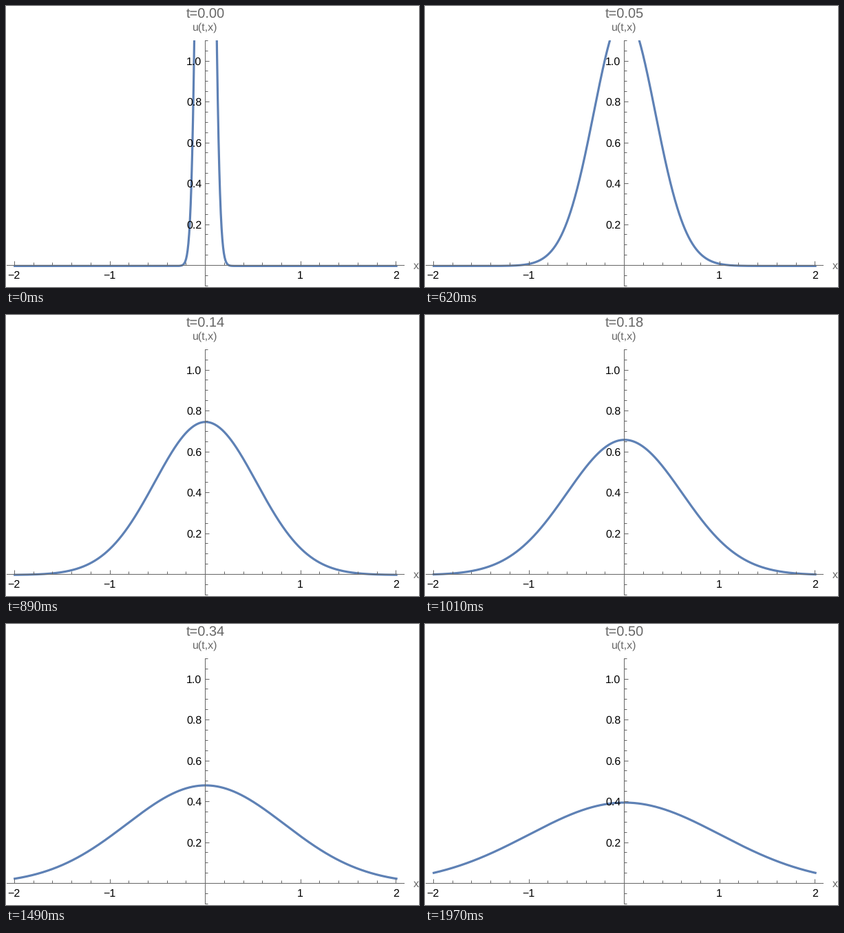
A matplotlib script that plays this animation: 600 px wide and 409 px high, repeating every 2.47 s.

```python
import numpy as np
import matplotlib.pyplot as plt
from matplotlib.animation import FuncAnimation
from matplotlib.collections import LineCollection
from matplotlib.patches import Rectangle

W, H, DPI = 600, 409, 64
PT = 72 / DPI                       # points per pixel
X0, Y0, SX, SY = 289.6, 377.5, 138.6, 297.5
GRAY, BLUE = "#666666", "#5e81b5"
STEP, HOLD, TICK, LAST = 30, 500, 10, 50
LOOP = 2 * HOLD + (LAST - 1) * STEP

plt.rcParams["font.family"] = "Liberation Sans"
plt.rcParams["text.hinting"] = "none"

fig = plt.figure(figsize=(W / DPI, H / DPI), dpi=DPI, facecolor="white")
ax = fig.add_axes([0, 0, 1, 1])
ax.set(xlim=(0, W), ylim=(H, 0))
ax.axis("off")


def label(x, y, text, size=16, color="black", ha="center"):
    return ax.text(x, y, text, fontsize=size * PT, color=color,
                   ha=ha, va="baseline", zorder=4)


def crisp(v):
    return np.floor(v) + 0.5


def draw_axes():
    left = crisp(X0)
    lines = [[(1, Y0), (579, Y0)], [(left, 50), (left, 408)]]
    for i in range(-10, 11):
        x = crisp(X0 + SX * i / 5)
        lines.append([(x, Y0), (x, Y0 - (6 if i % 5 == 0 else 4))])
    for i in range(-2, 23):
        y = crisp(Y0 - SY * i / 20)
        lines.append([(left, y), (left + (6 if i % 4 == 0 else 4), y)])
    # Ends already sit on pixel centres, so snapping would shift them
    ax.add_collection(LineCollection(lines, colors=GRAY, linewidths=PT,
                                     snap=False, zorder=3))

    for v in (-2, -1, 1, 2):
        label(X0 - 0.6 + SX * v, 397, str(v).replace("-", "\u2212"))
    for i in range(1, 6):
        label(284.5, round(Y0 - SY * i / 5 + 5.6), f"{i / 5:.1f}", ha="right")
    label(289.5, 36, "u(t,x)", color=GRAY)
    label(595.5, 383, "x", color=GRAY)


def kernel(t, x):
    return np.exp(-x ** 2 / (4 * t)) / np.sqrt(4 * np.pi * t)


draw_axes()
title = label(289.5, 18, "t=0.00", 20, GRAY)
xs = np.linspace(-2, 2, 1001)
curve, = ax.plot([], [], color=BLUE, lw=3.2 * PT, solid_capstyle="projecting",
                 solid_joinstyle="round", zorder=2)
curve.set_clip_path(Rectangle((0, 50), W, H - 50, transform=ax.transData))


def update(frame):
    ms = frame * TICK
    k = 0 if ms < HOLD else min(LAST, 1 + (ms - HOLD) // STEP)
    u = kernel(0.002 + k / 100, xs)
    curve.set_data(X0 + 0.3 + SX * xs, Y0 + 0.9 - SY * u)
    title.set_text(f"t={k / 100:.2f}")
    return curve, title


anim = FuncAnimation(fig, update, frames=LOOP // TICK, interval=TICK,
                     repeat=True, repeat_delay=0)
plt.show()
```
